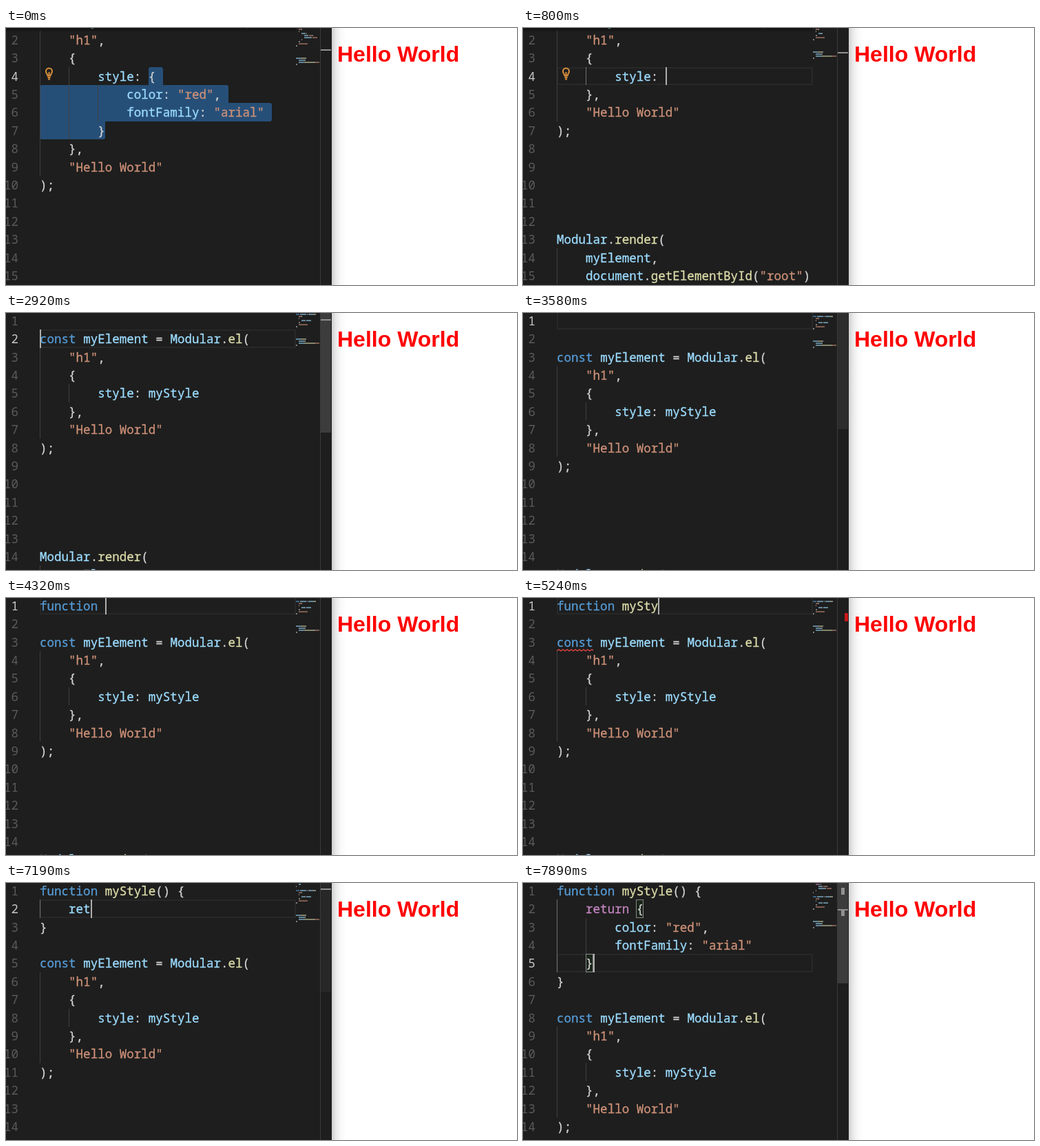
These frames come from a looping animation (742x374 px, 8000 ms). An HTML page:

```html
<!DOCTYPE html>
<html lang="en">
<head>
<meta charset="utf-8">
<title>Code editor with live preview</title>
<style>
  html, body { margin: 0; width: 742px; height: 374px; overflow: hidden; background: #fff; }
  #editor {
    position: absolute; left: 0; top: 0; width: 473px; height: 374px; overflow: hidden;
    background: #1e1e1e; color: #d4d4d4;
    font: 17.55px/26.4px "Noto Sans Mono", "DejaVu Sans Mono", monospace;
    font-variant-ligatures: none; white-space: pre;
  }
  #editor div, #editor svg { position: absolute; box-sizing: border-box; }
  #editor .num { left: -22px; width: 40px; text-align: right; color: #5a5a5a; }
  #editor .num.now { color: #c6c6c6; }
  .line { -webkit-text-stroke: .3px; }
  .current { border: 2px solid #282828; }
  .guide { background: #404040; }
  .guide.now { background: #707070; }
  .selected { background: #264f78; }
  .match { border: 1px solid #888; background: rgba(0, 100, 0, .1); }
  .caret { background: #aeafad; }
  .mini { opacity: .55; background: currentColor; }
  .shade { box-shadow: inset 0 6px 6px -6px #000; }
  .border { background: #3b3b3b; }
  .slider { background: #3c3c3c; }
  .mark { background: #909090; }
  .error { background: #c81818; }
  .key { color: #569cd6; } .flow { color: #c586c0; } .str { color: #ce9178; }
  .fn { color: #dcdcaa; } .id { color: #9cdcfe; }
  #page {
    position: absolute; left: 473px; top: 0; width: 269px; height: 374px;
    background: linear-gradient(90deg, #cfcfcf, #e9e9e9 6px, #f9f9f9 13px, #fff 21px);
  }
  h1 {
    position: absolute; left: 8px; top: 20px; margin: 0; white-space: nowrap;
    font: bold 32px/36px "Liberation Sans", Arial, sans-serif; color: #f00;
  }
</style>
</head>
<body>
<div id="editor"></div>
<div id="page"><h1>Hello World</h1></div>
<script>
const LOOP = 8000, LEFT = 49, CH = 10.53, ROW = 26.4, VIEW = 374;
const editor = document.getElementById('editor');

// Each step is a time and the parts of the editor state that change then.
const objectLines = ['            color: "red",', '            fontFamily: "arial"', '        }'];
const style = w => ({ body: ['        style: ' + w], col: 15 + w.length, on: 1 });
const first = w => ({ head: [w, ''], col: w.length, on: 1 });
const second = w => ({ head: ['function myStyle() {', '    ' + w, '}', ''], row: 2, col: 4 + w.length, on: 1 });
const pasted = cut => ({
  head: ['function myStyle() {', '    return {', ...objectLines.map(s => s.slice(cut)), '}', ''],
  row: 5, col: 9 - cut, on: 1, slider: 1
});

const steps = [
  [0, { head: [], body: ['        style: {', ...objectLines], row: 4, col: 15, on: 0, scroll: 20.4,
        selected: 1, bulb: 1, slider: 0, error: 0, match: [] }],
  [170, { on: 1 }], [510, { on: 0 }],
  [760, { ...style(''), selected: 0 }],
  [1050, { ...style('m'), bulb: 0 }], [1130, style('myS')],
  [1290, style('mySt')], [1370, style('mySty')], [1450, style('myStyl')], [1570, style('myStyle')],
  [2020, { row: 3, col: 5 }], [2060, { row: 2 }],
  [2350, { row: 1, scroll: 0, slider: 1 }], [2390, { col: 0 }], [2760, { on: 0 }],
  [2920, { head: [''], row: 2, on: 1 }], [3010, { head: ['', ''], row: 3 }],
  [3130, { row: 2 }], [3250, { row: 1 }],
  [3580, { on: 0, slider: .5 }], [3650, { slider: .35 }], [3740, { slider: .15 }], [3820, { slider: 0 }],
  [3990, first('f')], [4070, first('fun')], [4150, first('func')], [4240, first('functio')],
  [4320, first('function ')], [4490, first('function m')], [4570, first('function my')],
  [4780, first('function myS')], [4860, first('function mySt')], [4950, { error: 1 }],
  [5240, first('function mySty')], [5320, first('function myStyl')], [5450, first('function myStyle')],
  [5580, first('function myStyle ')], [5790, first('function myStyle')],
  [6040, first('function myStyle(')],
  [6120, { ...first('function myStyle()'), match: [[1, 16], [1, 17]] }],
  [6170, { ...first('function myStyle() '), match: [] }],
  [6250, first('function myStyle() {')],
  [6420, { ...first('function myStyle() {}'), col: 20 }],
  [6500, { ...second(''), slider: 1 }], [6580, { slider: .3 }], [6830, { error: 0 }],
  ...['r', 're', 'ret', 'retu', 'retur', 'return', 'return ']
    .map((w, i) => [[6990, 7070, 7190, 7270, 7350, 7430, 7510][i], second(w)]),
  [7850, pasted(0)],
  [7890, { ...pasted(4), match: [[2, 11], [5, 4]] }]
];

let state = {};
const states = steps.map(([time, change]) => state = { ...state, ...change, time });

const source = s => [
  ...s.head, 'const myElement = Modular.el(', '    "h1",', '    {', ...s.body, '    },',
  '    "Hello World"', ');', '', '', '', '', '', 'Modular.render(', '    myElement,',
  '    document.getElementById("root")', ');'
];

function tokens(line) {
  const parts = line.match(/"[^"]*"|\w+| +|[^\w\s"]/g) || [];
  let col = 0;
  return parts.map((text, i) => {
    let kind = '';
    if (text[0] === '"') kind = 'str';
    else if (/^(const|function)$/.test(text)) kind = 'key';
    else if (text === 'return') kind = 'flow';
    else if (/^\w/.test(text)) kind = parts[i + 1] === '(' || parts[i - 2] === 'function' ? 'fn' : 'id';
    const token = { text, kind, col };
    col += text.length;
    return token;
  });
}

const indent = line => line.match(/^ */)[0].length;
const box = (cls, x, y, w, h, css = '') =>
  `<div class="${cls}" style="left:${x}px;top:${y}px;width:${w}px;height:${h}px;${css}"></div>`;

const bulb = `<svg style="left:56px;top:57px" width="13" height="19" fill="none" stroke="#d9903d" stroke-width="2">
  <path d="M4.5 12.5C4.5 10 2 9.5 2 6a4.5 4.5 0 0 1 9 0C11 9.5 8.5 10 8.5 12.5ZM6.5 12V7M4.5 15h4M5 17.5h3"/></svg>`;

function squiggle(y) {
  let d = 'M0 3';
  for (let x = 3; x <= 54; x += 3) d += `L${x} ${x % 2 ? 1 : 3}`;
  return `<svg style="left:${LEFT}px;top:${y}px" width="53" height="5"><path d="${d}" fill="none" stroke="#f44747" stroke-width="1.2"/></svg>`;
}

function render(s) {
  const lines = source(s);
  const rowTop = row => (row - 1) * ROW - 2.2 - s.scroll;
  const colX = col => LEFT + col * CH;
  const rowBox = (cls, row, x, w, css) => {
    const y = Math.round(rowTop(row));
    return box(cls, x, y, w, Math.round(rowTop(row + 1)) - y, css);
  };
  const scale = VIEW / ((lines.length + 13.4) * ROW);
  const rulerY = row => Math.floor((row - 1) * ROW * scale - 2.8);
  let under = '', text = '', over = '';

  if (s.selected) {
    const corners = ['3px 3px 0 0', '3px 3px 0 0', '0 3px 3px 0', '0 0 3px 3px'];
    corners.forEach((radius, i) => {
      const from = i ? 0 : 15, to = lines[3 + i].length + (i < 3);
      under += rowBox('selected', 4 + i, colX(from), (to - from) * CH, `border-radius:${radius}`);
    });
  } else {
    under += rowBox('current', s.row, LEFT, 372);
  }

  // The guide of the block around the caret is brighter.
  const level = s.selected ? 0 : indent(lines[s.row - 1]);
  let start = s.row, end = s.row;
  while (start > 1 && indent(lines[start - 2]) >= level) start--;
  while (end < lines.length && indent(lines[end]) >= level) end++;

  lines.forEach((line, i) => {
    const row = i + 1, y = rowTop(row);
    for (let col = 0; col < indent(line); col += 4) {
      const now = col === level - 4 && row >= start && row <= end;
      under += rowBox(now ? 'guide now' : 'guide', row, Math.floor(colX(col)), 1);
    }
    text += `<div class="num${row === s.row ? ' now' : ''}" style="top:${y}px">${row}</div>`;
    text += `<div class="line" style="left:${LEFT}px;top:${y}px">`;
    for (const t of tokens(line)) {
      text += `<span class="${t.kind}">${t.text}</span>`;
      if (t.text.trim()) {
        over += box('mini ' + t.kind, 421 + t.col, 3 * row - 5, Math.min(t.text.length, 34 - t.col), 2);
      }
    }
    text += '</div>';
  });

  if (s.scroll) over += box('shade', 0, 0, 421, 6);
  over += box('border', 456, 0, 1, VIEW);
  over += box('slider', 457, 0, 15, Math.round(VIEW * scale), `opacity:${s.slider}`);
  over += box('mark', 457, rulerY(s.row), 15, 2);
  for (const [row, col] of s.match) {
    under += rowBox('match', row, Math.floor(colX(col)), 11);
    over += box('mark', 462, rulerY(row), 5, 10);
  }
  if (s.error) {
    const row = s.head.length + 1;
    over += squiggle(rowTop(row) + 23);
    over += box('error', 467, rulerY(row) + 1, 5, 12);
  }
  if (s.bulb) over += bulb;
  if (s.on) over += rowBox('caret', s.row, Math.round(colX(s.col)), 2);
  editor.innerHTML = under + text + over;
}

let shown;
function tick() {
  const t = performance.now() % LOOP;
  const next = states.filter(s => s.time <= t).pop();
  if (next !== shown) render(shown = next);
  requestAnimationFrame(tick);
}
tick();
</script>
</body>
</html>
```
